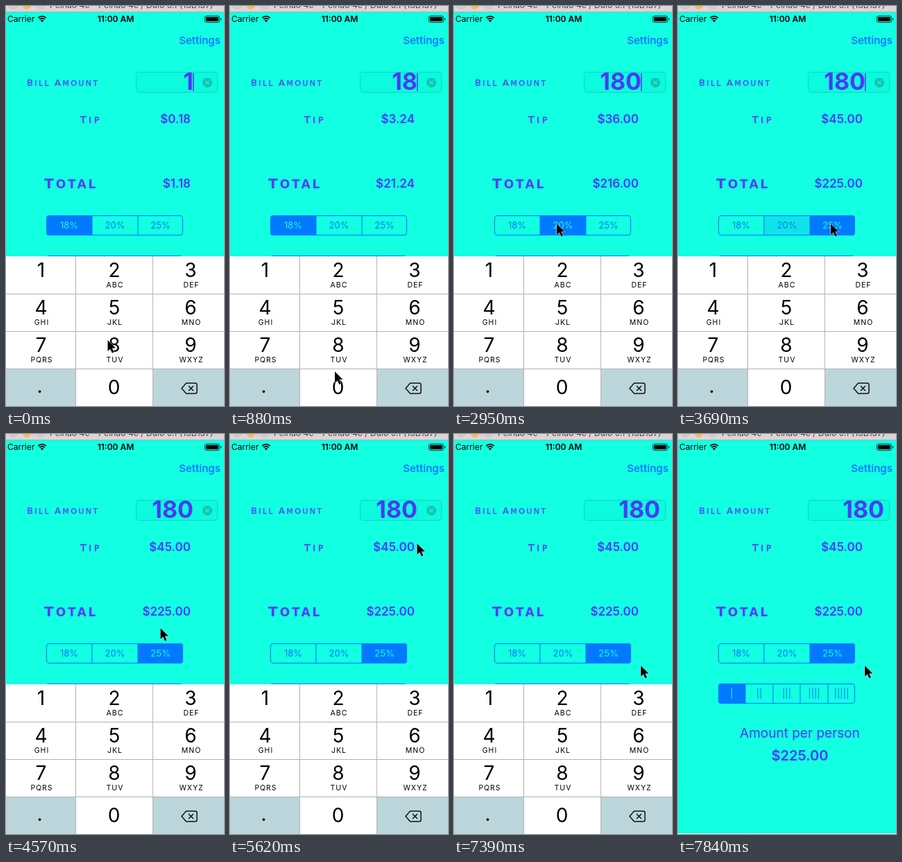
Recreate the animation shown at these times as an HTML page. Size 314 by 577 pixels, loop 7.99 s.

```html
<!DOCTYPE html>
<html lang="en">
<head>
<meta charset="utf-8">
<title>Tip calculator</title>
<style>
html, body { margin: 0; width: 100%; height: 100%; overflow: hidden; background: #12ffe2; }
svg { display: block; width: 314px; height: 577px; font-family: Inter, Roboto, sans-serif; }
.caps { font-family: "DejaVu Sans", sans-serif; fill: #5340f4; }
.money { font-weight: 600; fill: #4a3af6; }
.tint { fill: #087cff; }
</style>
</head>
<body>
<svg id="stage" viewBox="0 0 314 577" xmlns="http://www.w3.org/2000/svg"></svg>
<script>
const LOOP = 7990, STEP = 148, LEAD = 20;
const CYAN = '#12ffe2', BLUE = '#0079ff', KEY_GREY = '#bcd5da';
const stage = document.getElementById('stage');
const $ = id => document.getElementById(id);

const text = (x, y, size, str, attrs = '') =>
  `<text x="${x}" y="${y}" font-size="${size}" ${attrs}>${str}</text>`;
const rect = (x, y, w, h, attrs = '') =>
  `<rect x="${x}" y="${y}" width="${w}" height="${h}" ${attrs}/>`;
const mid = 'text-anchor="middle"', end = 'text-anchor="end"';

// Large first letter, smaller capitals after it.
function smallCaps(x, y, big, small, gap, words, attrs) {
  const spans = words.split(' ').map(w =>
    `<tspan font-size="${big}">${w[0]}</tspan><tspan>${w.slice(1).toUpperCase()}</tspan>`);
  return text(x, y, small, spans.join(' '), `class="caps" letter-spacing="${gap}" ${attrs}`);
}

function segments(id, y, edges, labels) {
  const left = edges[0], right = edges[edges.length - 1];
  let out = `<clipPath id="${id}Clip">${rect(left, y, right - left, 29, 'rx="4"')}</clipPath><g clip-path="url(#${id}Clip)">`;
  labels.forEach((_, i) => {
    out += rect(edges[i], y, edges[i + 1] - edges[i], 29, `id="${id}Fill${i}" fill="${BLUE}" opacity="0"`);
  });
  out += '</g>' + rect(left + .5, y + .5, right - left - 1, 28, `rx="3.5" fill="none" stroke="${BLUE}"`);
  labels.forEach((label, i) => {
    if (i) out += rect(edges[i] - .5, y, 1, 29, `fill="${BLUE}"`);
    out += text((edges[i] + edges[i + 1]) / 2, y + 19, 13, label, `id="${id}Text${i}" ${mid} fill="${BLUE}"`);
  });
  return out;
}

function paintSegment(id, i, level) {
  $(id + 'Fill' + i).setAttribute('opacity', level);
  $(id + 'Text' + i).setAttribute('fill', level > .5 ? CYAN : BLUE);
}

function statusBar() {
  const arc = r => `<path d="M${52 - r * .72} ${23 - r * .72}A${r} ${r} 0 0 1 ${52 + r * .72} ${23 - r * .72}" fill="none" stroke="#000" stroke-width="1.7"/>`;
  return text(2, 23, 12, 'Carrier') + arc(8) + arc(5) +
    '<path d="M52 23.5L49.8 21Q52 19.2 54.2 21Z"/>' +
    text(158, 23, 12, '11:00 AM', `${mid} font-weight="600"`) +
    rect(286.5, 14.5, 21, 9, 'rx="2" fill="none" stroke="#000" stroke-width=".8"') +
    rect(288, 16, 18, 6, 'rx="1"') + '<path d="M309 17Q311 19 309 21Z"/>';
}

function titleBar() {
  const dot = (x, c) => `<circle cx="${x}" cy="-1.5" r="5.8" fill="${c}" stroke="#b9b2b2" stroke-width=".6"/>`;
  return rect(0, 0, 314, 9, 'fill="#d9d5d8"') + rect(0, 8, 314, 1, 'fill="#b3afb3"') +
    dot(10, '#d0cbcd') + dot(30, '#fbc02f') + dot(50, '#d0cbcd') +
    text(63, 3, 12.2, 'Pelnao 4c – Pelnao 4c / Dulo 9.1 (13B137)', 'fill="#464446"');
}

function keyboard() {
  const xs = [0, 101, 212, 314], centers = [50.5, 156, 266];
  const letters = ['', 'ABC', 'DEF', 'GHI', 'JKL', 'MNO', 'PQRS', 'TUV', 'WXYZ'];
  let out = rect(0, 361, 314, 216, 'fill="#fff"');
  out += rect(0, 524, 100, 53, `fill="${KEY_GREY}"`) + rect(212, 524, 102, 53, `fill="${KEY_GREY}"`);
  out += rect(101, 470, 110, 53, `id="key8" fill="${KEY_GREY}"`) + rect(101, 524, 110, 53, `id="key0" fill="${KEY_GREY}"`);
  for (let r = 1; r < 4; r++) out += rect(0, 361 + 54 * r, 314, 1, 'fill="#b0b4b5"');
  for (const x of [xs[1], xs[2]]) out += rect(x - 1, 361, 1, 216, 'fill="#b0b4b5"');
  letters.forEach((word, i) => {
    const x = centers[i % 3], y = 391 + 54 * Math.floor(i / 3);
    out += text(x, y, 28, i + 1, mid) + text(x + 1, y + 15, 10.5, word, `${mid} letter-spacing="1"`);
  });
  return out + text(48.5, 558, 28, '.', mid) + text(155.5, 560, 28, '0', mid) +
    '<path d="M259.5 544H272.5Q275 544 275 546.5V556.5Q275 559 272.5 559H259.5L253 551.5ZM263 548L270 555M270 548L263 555" fill="none" stroke="#111" stroke-width="1.5" stroke-linejoin="round"/>';
}

stage.innerHTML =
  rect(0, 0, 314, 577, `fill="${CYAN}"`) + titleBar() + statusBar() +
  text(309, 55, 15, 'Settings', `${end} class="tint" font-weight="600"`) +
  smallCaps(30, 115, 13, 11, 2.4, 'Bill Amount', 'stroke="#5340f4" stroke-width=".25"') +
  smallCaps(107, 169, 14, 12, 3.9, 'Tip', 'stroke="#5340f4" stroke-width=".5"') +
  smallCaps(55, 263, 20, 17, 3, 'Total', 'font-weight="700"') +
  rect(187.5, 95.5, 117, 29, 'rx="4" fill="#0cfade" stroke="#0cd6c0"') +
  text(270, 121, 34, '', `id="bill" ${end} font-weight="700" fill="#4a3af6"`) +
  rect(269, 97, 1.8, 26, 'id="caret" fill="#3a5cf0"') +
  `<g id="clear"><circle cx="290" cy="110.5" r="7" fill="#18c5b0"/><path d="M287.3 107.8l5.4 5.4m0-5.4l-5.4 5.4" stroke="${CYAN}" stroke-width="1.2"/></g>` +
  text(266, 169, 17, '', `id="tip" class="money" ${end}`) +
  text(266, 262, 17, '', `id="total" class="money" ${end}`) +
  segments('rate', 302, [58, 124, 190, 255], ['18%', '20%', '25%']) +
  segments('split', 360, [58, 97, 137, 176, 216, 255], [1, 2, 3, 4, 5].map(n => '|'.repeat(n))) +
  text(175.5, 438, 19, 'Amount per person', `${mid} fill="#4a3af6"`) +
  text(175.5, 471, 20, '', `id="each" class="money" ${mid}`) +
  `<g id="keys">${keyboard()}</g>` +
  '<path id="pointer" d="M0 0V16L3.7 12.6L6.3 18.6L9 17.4L6.4 11.5H11.5Z" stroke="#fff" stroke-width="1" stroke-linejoin="round" paint-order="stroke"/>';
paintSegment('split', 0, 1);

// Pointer stops: tick, x, y.
const path = [
  [0, 146.5, 482], [4, 147, 482], [7, 153, 550], [11, 153, 550], [12, 155, 464],
  [14, 150, 375], [16, 148, 314], [20, 148, 314], [24, 220, 314], [28, 220, 314],
  [29, 221, 322], [31, 222.5, 280], [36, 268, 212], [38, 269.5, 158], [40, 269.5, 158],
  [42, 262, 250], [44, 212, 515], [45, 203, 558], [46, 214, 535], [48, 264, 370], [49, 269, 334]
];
// Ticks at which the caret is hidden: first, last.
const hidden = [[14, 15], [21, 23], [30, 32], [39, 41], [46, 48]];

function pointerAt(k) {
  const i = path.findIndex(p => p[0] >= k);
  if (i < 0) return path[path.length - 1].slice(1);
  if (!i) return path[0].slice(1);
  const [a, ax, ay] = path[i - 1], [b, bx, by] = path[i], p = (k - a) / (b - a);
  return [ax + (bx - ax) * p, ay + (by - ay) * p];
}

function caretAt(k) {
  if (k >= 50 || hidden.some(([a, b]) => k >= a && k <= b)) return 0;
  return k === 37 ? .5 : k === 38 ? .12 : 1;
}

function draw(time) {
  const k = Math.floor((time % LOOP + LEAD) / STEP) % 54;
  const bill = k < 3 ? 1 : k < 9 ? 18 : 180;
  const pick = k < 19 ? 0 : k < 25 ? 1 : 2;
  const tip = bill * [.18, .2, .25][pick];
  const editing = k < 50;
  const money = n => '$' + n.toFixed(2);

  $('bill').textContent = bill;
  $('bill').setAttribute('x', editing ? 270 : 297);
  $('clear').setAttribute('opacity', editing ? 1 : 0);
  $('caret').setAttribute('opacity', caretAt(k));
  $('tip').textContent = money(tip);
  $('total').textContent = $('each').textContent = money(bill + tip);

  for (let i = 0; i < 3; i++) paintSegment('rate', i, i === pick ? 1 : 0);
  if (k === 18) paintSegment('rate', 1, .15);
  if (k === 24) paintSegment('rate', 2, .15);
  if (k === 25) paintSegment('rate', 1, .2);

  $('key8').setAttribute('opacity', k === 1 || k === 2 ? 1 : 0);
  $('key0').setAttribute('opacity', k === 8 ? 1 : 0);
  const slide = Math.max(0, (k - 50) / 3);
  $('keys').setAttribute('transform', `translate(0 ${215 * (1 - Math.pow(1 - slide, 2.2))})`);
  $('pointer').setAttribute('transform', `translate(${pointerAt(k)})`);
}

const start = performance.now();
function loop(now) {
  draw(Math.max(0, now - start));
  requestAnimationFrame(loop);
}
draw(0);
requestAnimationFrame(loop);
</script>
</body>
</html>
```
